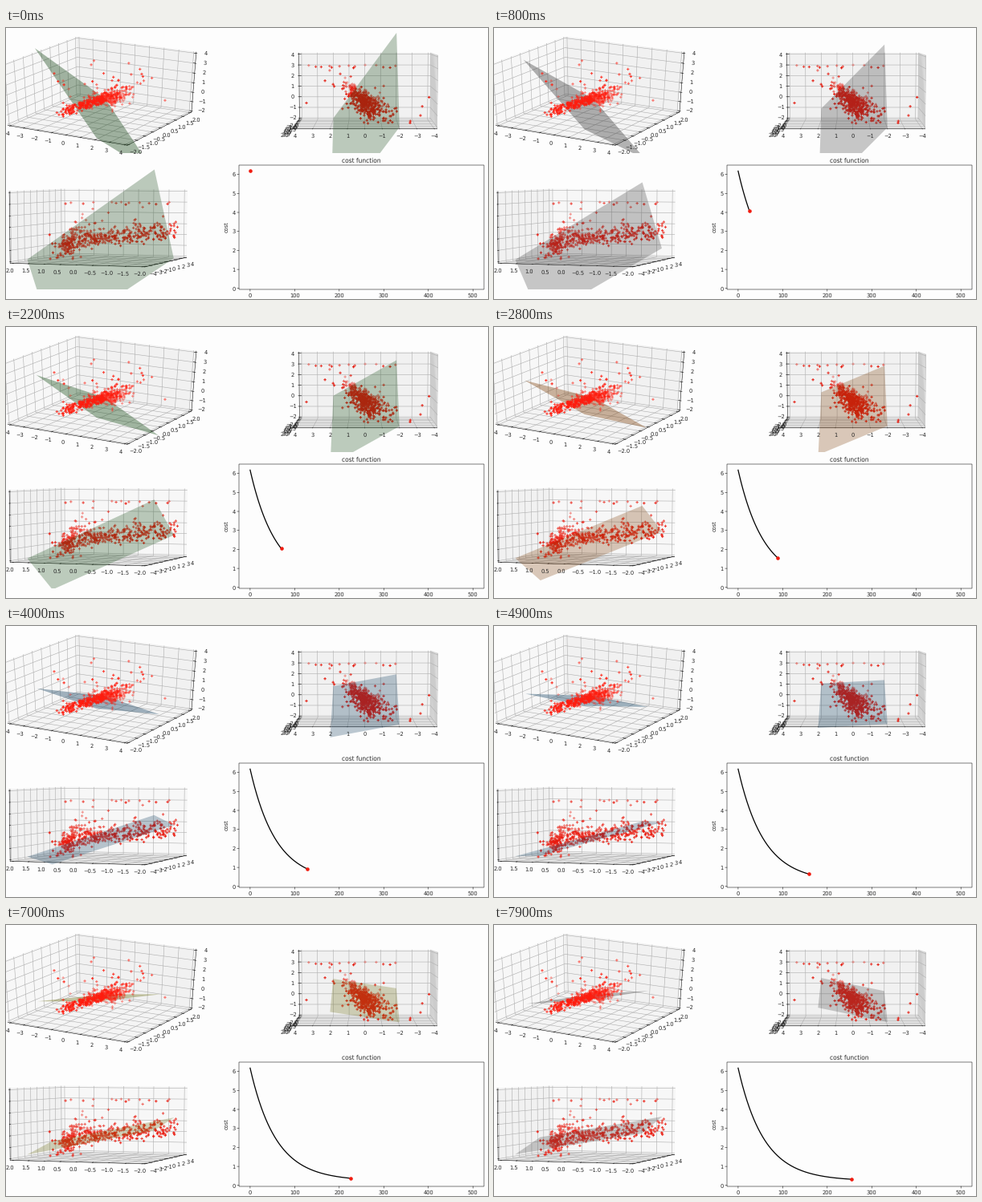
These frames come from a looping animation (600 px wide and 338 px high, 8 s). A matplotlib script:

```python
import numpy as np
import matplotlib.pyplot as plt
from matplotlib.animation import FuncAnimation
from matplotlib.colors import to_rgb
from matplotlib.patches import Polygon, Rectangle

W, H, DPI = 600, 338, 64
PX = 72 / DPI            # points per pixel
PT = 0.63 * PX           # chart point size on this stage
BG = "#fdfdfd"
FRAMES = 80

plt.rcParams.update({"font.family": "DejaVu Sans", "text.hinting": "none",
                     "path.snap": False})
fig = plt.figure(figsize=(W / DPI, H / DPI), dpi=DPI, facecolor=BG)
ax = fig.add_axes([0, 0, 1, 1])
ax.set_xlim(0, W)
ax.set_ylim(H, 0)
ax.axis("off")

# Chart cells are 305 x 155 px; the cube unit follows from that.
CELL_W, CELL_H = 305, 155
SX, SY = CELL_W / 1.85, CELL_H / 1.85
DIST = 10
EDGE = 0.5 * 25 / 24

MID = np.array([0, 0, 1])
SPAN = np.array([8, 4, 6])
TICKS = [np.arange(-4, 5), np.arange(-2, 2.1, 0.5), np.arange(-2, 5)]
FORMATS = ["%d", "%.1f", "%d"]


def text(x, y, s, size=10.6, **kw):
    kw = {"ha": "center", "va": "center", "color": "#262626", **kw}
    ax.text(x, y, s.replace("-", "\u2212"), fontsize=size * PT, zorder=9, **kw)


def stroke(pts, color, width, z):
    return ax.plot(*np.asarray(pts).T, color=color, lw=width * PT, zorder=z)[0]


def to_cube(pts):
    return (np.asarray(pts, float) - MID) / SPAN


class View:
    def __init__(self, left, top, azim, elev, walls, red, plane_alpha, plane_z):
        self.cx, self.cy = left + 0.95 * SX, top + 0.9 * SY
        a, e = np.radians([azim, elev])
        self.basis = np.array([
            [-np.sin(a), np.cos(a), 0],
            [-np.sin(e) * np.cos(a), -np.sin(e) * np.sin(a), np.cos(e)],
            [np.cos(e) * np.cos(a), np.cos(e) * np.sin(a), np.sin(e)],
        ])
        self.wall = np.array([*walls, -1])
        self.red, self.alpha = red, plane_alpha
        self.draw_box()
        self.plane = Polygon(np.zeros((4, 2)), lw=0, zorder=plane_z)
        ax.add_patch(self.plane)
        self.plane.set_clip_path(
            Rectangle((left, top), CELL_W, CELL_H, transform=ax.transData))

    def project(self, pts):
        u, v, d = self.basis @ np.atleast_2d(pts).T
        s = DIST / (DIST - d)
        return np.c_[self.cx + SX * u * s, self.cy - SY * v * s]

    def draw_box(self):
        bx, by, _ = self.wall
        outward = np.array([[0, -by, -1], [-bx, 0, -1], [-bx, by, 0]])
        for i, tone in enumerate((0.95, 0.90, 0.925)):
            j, k = [n for n in range(3) if n != i]
            pane = np.zeros((4, 3))
            pane[:, i] = self.wall[i]
            pane[:, j] = [-1, 1, 1, -1]
            pane[:, k] = [-1, -1, 1, 1]
            ax.add_patch(Polygon(self.project(pane * EDGE), color=(tone,) * 3,
                                 alpha=0.5, lw=0.8 * PT, zorder=1))

            side = outward[i] * EDGE
            ends = np.array([side, side])
            ends[:, i] = [-EDGE, EDGE]
            stroke(self.project(ends), "black", 0.8, 3)

            tick_dir = 1 if i == 0 else 0
            for value in TICKS[i]:
                t = (value - MID[i]) / SPAN[i]
                line = np.zeros((3, 3))
                line[:, i] = t
                line[:, j] = self.wall[j] * EDGE * np.array([-1, 1, 1])
                line[:, k] = self.wall[k] * EDGE * np.array([1, 1, -1])
                stroke(self.project(line), "#b0b0b0", 0.95, 2)

                mark = np.array([side, side])
                mark[:, i] = t
                mark[:, tick_dir] += outward[i][tick_dir] * np.array([-0.2, 0.1]) / 12
                stroke(self.project(mark), "black", 0.8, 3)

                spot = outward[i] * (EDGE + 0.055)
                spot[i] = t
                x, y = self.project(spot)[0]
                text(x, y + (1 if i == 2 else 4), FORMATS[i] % value)

    def scatter(self, cube):
        depth = self.basis[2] @ cube.T
        order = np.argsort(depth)
        near = (depth - depth.min()) / np.ptp(depth)
        rgba = np.c_[np.tile(to_rgb(self.red), (len(cube), 1)), 0.35 + 0.65 * near]
        xy = self.project(cube)[order]
        ax.scatter(*xy.T, s=(3.3 * PX) ** 2, marker="P", c=rgba[order],
                   linewidths=0, zorder=5)

    def set_plane(self, corners, color):
        self.plane.set_xy(self.project(corners))
        self.plane.set_facecolor((*color, self.alpha))


def make_data(n=506, capped=14):
    """Rooms, age and price, standardised; older homes vary more."""
    rng = np.random.default_rng(7)
    y = 1.117 - 3.45 * rng.random(n) ** 2
    old = y > 0.3
    x = -0.18 * y + rng.standard_t(5, n) * np.where(old, 0.62, 0.42)
    x = np.clip(x, -3, 3.4)
    z = 0.3 * x + 0.85 * np.maximum(x - 0.2, 0) - 0.2 * y - 0.15
    z += rng.normal(0, 1, n) * np.where(old, 0.48, 0.22)
    z -= np.where(y > 0.6, 0.25, 0)
    lift = rng.random(n) < 0.03
    z[lift] += rng.random(lift.sum()) * 1.8
    x[:capped] = np.linspace(-1.8, 3.4, capped) + rng.normal(0, 0.2, capped)
    y[:capped] = rng.permutation(np.linspace(-2.1, 1.1, capped))
    z[:capped] = 2.99
    x[capped:capped + 5] = [3.45, -3.8, -3.4, -3.3, -2.7]
    y[capped:capped + 5] = 0.9
    z[capped:capped + 5] = [-0.1, 0.4, -0.4, -1.2, -1.7]
    return np.c_[x, y, np.clip(z, -1.9, 2.99)]


def descend(steps=300, rate=0.01):
    """Least squares by gradient descent on two standardised features."""
    cov = np.array([[1, -0.24], [-0.24, 1]])
    target = np.array([0.695, -0.377])
    w, b = np.array([-2.0, -2.0]), -2.0
    path, cost = [], []
    for _ in range(steps):
        path.append((*w, b))
        cost.append(0.5 * (1 + b * b + w @ cov @ w - 2 * w @ target))
        w = w - rate * (cov @ w - target)
        b -= rate * b
    return np.array(path), np.array(cost)


views = [
    View(-38.2, 0.8, -60, 30, (-1, 1), "#ff1c0e", 0.38, 4),
    View(290, 0.8, 90, 5, (-1, -1), "#e4180c", 0.28, 6),
    View(-38.4, 171, 200, 5, (1, 1), "#ea1a0e", 0.28, 6),
]
cloud = to_cube(make_data())
for view in views:
    view.scatter(cloud)

# Cost chart
LEFT, TOP = 290, 171
BOTTOM = TOP + CELL_H


def cost_x(i):
    return 303.9 + 0.5546 * i


def cost_y(c):
    return 324.8 - 23.7 * c


ax.add_patch(Rectangle((LEFT, TOP), CELL_W, CELL_H, fc="none", ec="black",
                       lw=0.8 * PT, zorder=4))
for i in range(0, 501, 100):
    stroke([(cost_x(i), BOTTOM), (cost_x(i), BOTTOM + 2.2)], "black", 0.8, 4)
    text(cost_x(i), BOTTOM + 4.4, str(i), va="top")
for c in range(7):
    stroke([(LEFT - 2.2, cost_y(c)), (LEFT, cost_y(c))], "black", 0.8, 4)
    text(LEFT - 4.4, cost_y(c), str(c), ha="right", va="center_baseline")
text(LEFT + CELL_W / 2, TOP - 3.2, "cost function", 12, va="baseline")
text(276, TOP + CELL_H / 2, "cost", rotation=90)

path, cost = descend()
curve = stroke([(0, 0)], "black", 2, 5)
dot, = ax.plot([], [], "o", color="#f01c10", ms=4.6 * PX, mew=0, zorder=6)

CORNERS = np.array([(-2, -2), (2, -2), (2, 2), (-2, 2)])
CYCLE = [np.array(to_rgb(f"C{n}")) for n in range(10)]


def update(frame):
    step = max(0, int(3.245 * frame - 0.9))
    *w, b = path[step]
    plane = to_cube(np.c_[CORNERS, CORNERS @ w + b])
    color = CYCLE[(step + 2) % 10] * (0.42 + 0.16 * min(1, step / 200))
    for view in views:
        view.set_plane(plane, color)
    n = np.arange(step + 1)
    curve.set_data(cost_x(n), cost_y(cost[:step + 1]))
    dot.set_data([cost_x(step)], [cost_y(cost[step])])
    return [v.plane for v in views] + [curve, dot]


anim = FuncAnimation(fig, update, frames=FRAMES, interval=100,
                     repeat=True, repeat_delay=0, blit=False)
plt.show()
```
